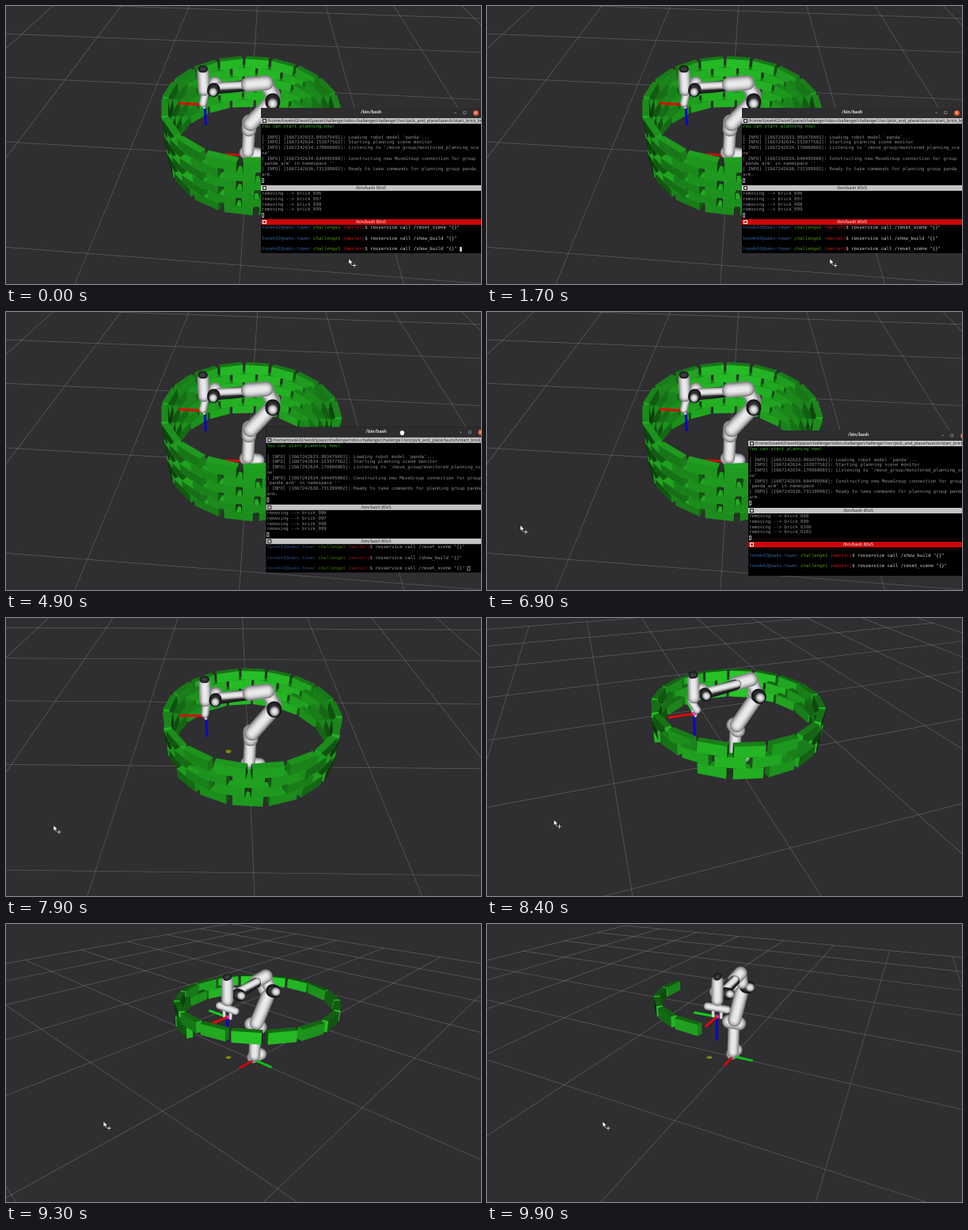
These frames come from a looping animation (600 px wide and 352 px high, 10000 ms). An HTML page with a canvas:

```html
<!DOCTYPE html>
<html lang="en">
<head>
<meta charset="utf-8">
<title>Robot brick wall</title>
<style>
html, body { margin: 0; width: 100%; height: 100%; overflow: hidden; background: #2f2e30; }
#stage { position: relative; width: 600px; height: 352px; overflow: hidden; }
canvas { position: absolute; left: 0; top: 0; width: 600px; height: 352px; }
#term {
  position: absolute; left: 322px; top: 129px; width: 278px; height: 184px; overflow: hidden;
  background: #000; color: #8d8d8d; text-rendering: geometricPrecision;
  font: 5.7px/6.75px "DejaVu Sans Mono", monospace;
}
#term div { position: absolute; white-space: pre; }
#term .title {
  left: 0; top: 0; width: 278px; height: 12.5px; background: #2d2c2e; color: #eee;
  font: bold 6px/12.5px Lato, sans-serif; text-align: center;
}
#term .head {
  left: 0; width: 278px; height: 7px; background: #c4c4c4; color: #222;
  font: 5.5px/7px "Open Sans", sans-serif; text-align: center; overflow: hidden;
}
#term .head::before {
  content: ""; position: absolute; left: 2px; top: 1.5px; width: 3px; height: 3px; border: .5px solid currentColor;
}
#term .head.on { background: #cc0808; color: #fff; }
#term .path { text-align: left; text-indent: 8px; }
#term .pane { left: 1px; }
#term .btn { color: #ddd; font: 7px/12.5px "DejaVu Sans", sans-serif; top: 0; }
#term .close {
  left: 267.5px; top: 2.5px; width: 7.5px; height: 7.5px; border-radius: 50%;
  background: #e0552b; color: #fff; font: 6px/7.5px "DejaVu Sans", sans-serif; text-align: center;
}
.ok { color: #38b52c; }
.usr { color: #3465a4; } .dir { color: #4e9a06; } .br { color: #d01818; }
.cmd { color: #d5d5d5; }
.dim { filter: brightness(.75); }
.caret { display: inline-block; box-sizing: border-box; width: 3.4px; height: 6px; vertical-align: top; border: .5px solid #aaa; }
.caret.full { background: #ddd; }
.caret.off { visibility: hidden; }
svg { position: absolute; left: 0; top: 0; overflow: visible; }
</style>
</head>
<body>
<div id="stage">
  <canvas id="view" width="1200" height="704"></canvas>
  <div id="term">
    <div class="title">/bin/bash</div>
    <div class="btn" style="left:244px">–</div>
    <div class="btn" style="left:255px">▫</div>
    <div class="close">×</div>
    <div class="head path" style="top:12.5px">/home/tovek42/workSpace/challenge/robo-challenge/challenge1/src/pick_and_place/launch/start_brick_build.launch</div>
    <div class="pane" style="top:21px"><span class="ok">You can start planning now!</span>

[ INFO] [1667242633.993479491]: Loading robot model 'panda'...
[ INFO] [1667242634.153077562]: Starting planning scene monitor
[ INFO] [1667242634.170060065]: Listening to '/move_group/monitored_planning_sce
ne'
[ INFO] [1667242634.644495060]: Constructing new MoveGroup connection for group
'panda_arm' in namespace ''
[ INFO] [1667242636.731399902]: Ready to take commands for planning group panda_
arm.
<span class="caret"></span></div>
    <div class="head" style="top:97.5px">/bin/bash 80x5</div>
    <div class="pane" id="log" style="top:106px"></div>
    <div class="head" id="head" style="top:140.5px">/bin/bash 80x5</div>
    <div class="pane" id="shell" style="top:149px"></div>
  </div>
  <svg width="1" height="1">
    <g id="arrow">
      <path d="M0 0V7L1.7 5.4L3 8.2L4.2 7.6L3 5H5.2Z" fill="#fff" stroke="#111" stroke-width=".5"/>
      <path d="M4 8.5H10M7 5.5V11.5" stroke="#111" stroke-width="2"/>
      <path d="M4.3 8.5H9.7M7 5.8V11.2" stroke="#eee" stroke-width=".9"/>
    </g>
    <path id="hand" d="M-3 0Q-3 -3 0 -3T3 0T1 3.6H-1Q-3 2 -3 0Z" fill="#fff" stroke="#111" stroke-width=".5"/>
  </svg>
</div>
<script>
const $ = id => document.getElementById(id);
const ctx = $('view').getContext('2d');
const LOOP = 10000, RAD = Math.PI / 180;
const GRAB = 4500, DROP = 5300, ENTER = 6200, CLOSE = 7000, ORBIT = 7600;

// Orbit camera: focus point, its place on screen, focal length, distance
const FOCUS = [.184, -.154, .045], CX = 281, CY = 169, FOCAL = 470, DIST = 3.39;
const CELL = 1.06;

const PER_ROW = 17, ROWS = 6, STEP = 2 * Math.PI / PER_ROW;
const RING = .66, THICK = .05, LENGTH = .212, HEIGHT = .09, BOTTOM = .065;

// time, x, y
const MOUSE = [
  [3700, 433, 320], [GRAB, 494, 136], [5000, 502, 157], [DROP, 502, 157],
  [6300, 19, 290], [6900, 42, 270], [7900, 60, 262.5], [8800, 104, 250], [9900, 146, 250]
];

const clamp = (v, lo, hi) => Math.min(hi, Math.max(lo, v));
const mix = (a, b, k) => a.map((v, i) => v + (b[i] - v) * k);

function mouse(t) {
  t = clamp(t, MOUSE[0][0], 9900);
  const i = Math.max(1, MOUSE.findIndex(m => m[0] >= t));
  const a = MOUSE[i - 1], b = MOUSE[i];
  return mix(a, b, (t - a[0]) / (b[0] - a[0])).slice(1);
}

let cam, items;

// Dragging turns the view
function setCamera(t) {
  const [mx, my] = mouse(Math.max(t, ORBIT));
  const yaw = .0131 * (mx - 61), pitch = (29 + .86 * (my - 250)) * RAD;
  const s = Math.sin(pitch), c = Math.cos(pitch);
  cam = { s, c, cy: Math.cos(yaw), sy: Math.sin(yaw), eye: [0, -DIST * c, DIST * s] };
}

// world direction -> right, forward, up
const turn = ([x, y, z]) => [-x * cam.cy + y * cam.sy, -x * cam.sy - y * cam.cy, z];
const local = p => turn(p.map((v, i) => v - FOCUS[i]));

function toCam(p) {
  const [r, u, w] = local(p);
  return [r, -u * cam.s - w * cam.c, DIST + u * cam.c - w * cam.s];
}
const flat = ([x, y, z]) => [CX + FOCAL * x / z, CY + FOCAL * y / z, z];
const project = p => flat(toCam(p));
const depth = (a, b) => toCam(mix(a, b, .5))[2];

function line(a, b, width, color) {
  ctx.beginPath();
  ctx.moveTo(a[0], a[1]);
  ctx.lineTo(b[0] + .01, b[1]);
  ctx.lineWidth = width;
  ctx.strokeStyle = color;
  ctx.stroke();
}

function gridLine(p, q) {
  let a = toCam(p), b = toCam(q);
  const near = .2;
  if (a[2] < near && b[2] < near) return;
  if (a[2] < near) a = mix(a, b, (near - a[2]) / (b[2] - a[2]));
  if (b[2] < near) b = mix(b, a, (near - b[2]) / (a[2] - b[2]));
  line(flat(a), flat(b), .7, 'rgba(165,165,168,.4)');
}

function grid() {
  const e = 5 * CELL;
  for (let k = -e; k < e + .1; k += CELL) {
    gridLine([k, -e, 0], [k, e, 0]);
    gridLine([-e, k, 0], [e, k, 0]);
  }
}

function face(pts, normal) {
  const mid = local(mix(pts[0], pts[2], .5)), n = turn(normal);
  const ray = cam.eye.map((v, i) => v - mid[i]);
  const d = ray.reduce((sum, v, i) => sum + v * n[i], 0) / Math.hypot(...ray);
  if (d <= 0) return;
  const g = 28 + 186 * d;
  ctx.fillStyle = ctx.strokeStyle = `rgb(${g * .2},${g},${g * .2})`;
  ctx.lineWidth = .25;
  ctx.beginPath();
  pts.forEach(p => ctx.lineTo(...project(p).slice(0, 2)));
  ctx.closePath();
  ctx.fill();
  ctx.stroke();
}

function brick(row, i) {
  const a = 2 * RAD + STEP * (i + (row % 2 ? .5 : 0));
  const n = [Math.cos(a), Math.sin(a), 0], t = [-n[1], n[0], 0], up = [0, 0, 1];
  const mid = [RING * n[0], RING * n[1], BOTTOM + HEIGHT * (row + .5)];
  const axes = [[n, THICK / 2], [t, LENGTH / 2], [up, HEIGHT / 2]];
  items.push([toCam(mid)[2], () => axes.forEach(([dir, half], k) => {
    const [u, hu] = axes[(k + 1) % 3], [v, hv] = axes[(k + 2) % 3];
    for (const side of [-1, 1]) {
      const corner = (su, sv) => mid.map((m, j) => m + side * half * dir[j] + su * hu * u[j] + sv * hv * v[j]);
      face([corner(-1, -1), corner(1, -1), corner(1, 1), corner(-1, 1)], dir.map(d => d * side));
    }
  })]);
}

function wall(t) {
  const s = Math.max(0, t - 6900) / 1000;
  const gone = Math.floor(39 * s - 2.2 * s * s);
  for (let n = gone; n < PER_ROW * ROWS; n++) brick(Math.floor(n / PER_ROW), n % PER_ROW);
}

const shades = (...tones) => tones.map(v => `rgb(${v},${v},${v + 2})`);
const WHITE = shades(136, 185, 214, 233), DARK = shades(22, 38, 50, 62);
const PINK = ['#c02090', '#e030a8', '#f040b8', '#f860c8'];

function limb(a, b, r, tones = WHITE, bias = 0) {
  items.push([depth(a, b) - bias, () => {
    const p = project(a), q = project(b), w = 2 * r * FOCAL / ((p[2] + q[2]) / 2);
    ctx.lineCap = 'round';
    tones.forEach((tone, i) => line(p, q, w * (1 - .22 * i), tone));
  }]);
}

// A white drum with a dark rim on one side
function joint(x, z, r) {
  limb([x, -.05, z], [x, .01, z], r);
  limb([x, .035, z], [x, .055, z], r * .95, DARK, .04);
  limb([x, .07, z], [x, .075, z], r * .6, WHITE, .08);
}

function axis(from, step, color) {
  const to = from.map((v, i) => v + step[i]);
  items.push([depth(from, to), () => {
    ctx.lineCap = 'butt';
    line(project(from), project(to), 3, color);
  }]);
}

function robot() {
  const elbow = [-.17, 0, .635], tip = [.36, 0, .54], base = [0, 0, .005];
  limb([-.09, 0, .03], [.02, 0, .04], .055);
  limb([0, 0, .05], [0, 0, .3], .052);
  limb([0, -.05, .35], [0, .05, .35], .06);
  limb([-.01, 0, .37], [-.15, 0, .58], .06, WHITE, .03);
  joint(elbow[0], elbow[2], .06);
  limb([-.16, 0, .67], [-.11, 0, .765], .052);
  limb([-.11, 0, .77], [.02, 0, .75], .056, WHITE, .02);
  limb([.02, 0, .74], [.26, 0, .7], .042, DARK);
  limb([.0, 0, .75], [.26, 0, .72], .029, WHITE, .03);
  joint(.28, .715, .05);
  limb([.36, 0, .83], [.36, 0, .68], .045, WHITE, .04);
  limb([.35, 0, .865], [.37, 0, .865], .026, DARK, .08);
  limb([.36, -.085, .615], [.36, .085, .615], .03, WHITE, .02);
  for (const y of [-.035, .035]) limb([.36, y, .6], [.36, y, .54], .013);

  axis(tip, [.21, 0, 0], '#e00a0a');
  axis(tip, [0, -.21, 0], '#0fd01a');
  axis(tip, [0, 0, -.21], '#0808c8');
  limb(tip, tip, .016, PINK, .05);
  axis(base, [.2, 0, 0], '#c80a0a');
  axis(base, [0, .2, 0], '#0fc01a');
}

function scene(t) {
  setCamera(t);
  ctx.setTransform(2, 0, 0, 2, 0, 0);
  ctx.fillStyle = '#2f2e30';
  ctx.fillRect(0, 0, 600, 352);
  ctx.lineCap = 'butt';
  ctx.lineJoin = 'round';
  grid();
  if (t >= ORBIT) {
    ctx.fillStyle = '#85821c';
    ctx.beginPath();
    ctx.ellipse(CX, CY, 3.5, 3.5 * cam.s, 0, 0, 7);
    ctx.fill();
  }
  items = [];
  wall(t);
  robot();
  items.sort((a, b) => b[0] - a[0]).forEach(item => item[1]());
}

const prompt = call => '<span class="usr">tovek42@oaks-tower</span> <span class="dir">challenge1</span> ' +
  `<span class="br">(master)</span><span class="cmd">$ rosservice call /${call} "{}" </span>`;
const caret = kind => `<span class="caret ${kind}"></span>`;

function put(el, html) {
  if (el.shown !== html) el.innerHTML = el.shown = html;
}

function terminal(t) {
  const term = $('term');
  term.style.display = t < CLOSE ? '' : 'none';
  const from = mouse(GRAB), to = mouse(clamp(t, GRAB, DROP));
  term.style.transform = `translate(${to[0] - from[0]}px,${to[1] - from[1]}px)`;

  const sent = t >= ENTER, focus = t < GRAB || t >= DROP;
  const first = sent ? 98 : 96;
  put($('log'), [0, 1, 2, 3].map(k => `removing --> brick_0${first + k}\n`).join('') + caret(''));

  const lit = t < 600 || Math.floor(t / 600) % 2 === 1;
  const kind = !focus ? '' : lit ? 'full' : 'off';
  const typed = t < 600 ? 'show_build' : 'reset_scene';
  put($('shell'), sent
    ? `\n${prompt('show_build')}\n\n${prompt('reset_scene')}\n`
    : `${prompt('reset_scene')}\n\n${prompt('show_build')}\n\n${prompt(typed)}${caret(kind)}`);
  $('head').className = focus ? 'head on' : 'head';
  $('shell').className = focus ? 'pane' : 'pane dim';
}

function pointer(t) {
  const grab = t >= GRAB && t < DROP, [x, y] = mouse(t);
  for (const id of ['arrow', 'hand']) {
    $(id).setAttribute('transform', `translate(${x},${y})`);
    $(id).style.display = (id === 'hand') === grab ? '' : 'none';
  }
}

const start = performance.now();
function frame() {
  const t = Math.floor((performance.now() - start) % LOOP / 100) * 100;
  scene(t);
  terminal(t);
  pointer(t);
  requestAnimationFrame(frame);
}
frame();
</script>
</body>
</html>
```
